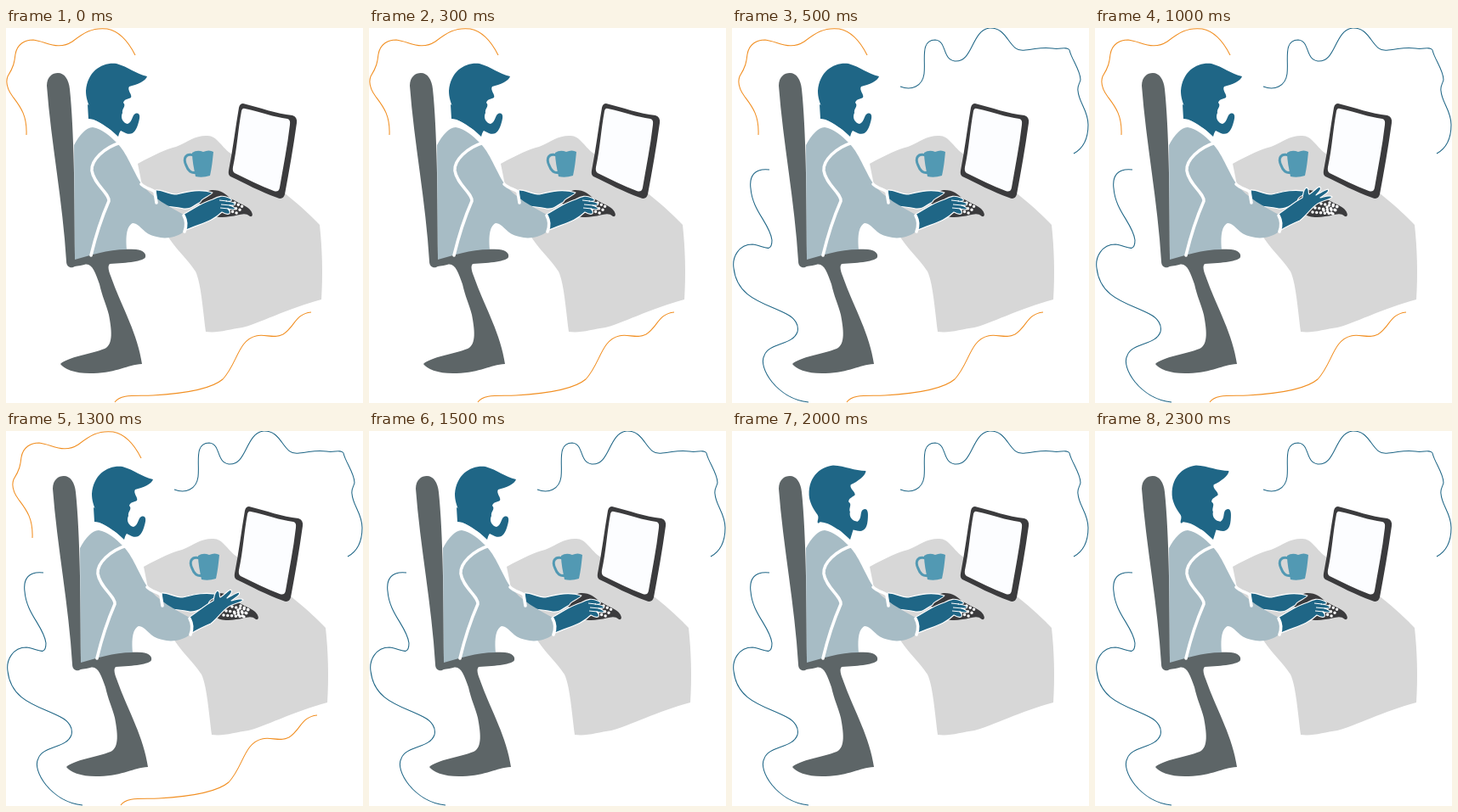
An HTML page for the animation above (2.5 s loop, 420 by 442 pixels).

```html
<!DOCTYPE html>
<html lang="en">
<head>
<meta charset="utf-8">
<title>Working at the desk</title>
<style>
  html, body { margin: 0; width: 100%; height: 100%; overflow: hidden; background: #fff; }
  svg { display: block; width: 420px; height: 442px; }
  .line { fill: none; stroke-width: 1.05; }
  .skin { fill: #1f6686; }
  .hand { fill: #1f6686; stroke: #fff; stroke-width: 1.1; stroke-linejoin: round; }
  .ink { fill: #3b3b3d; }
  .seam { fill: none; stroke: #fff; stroke-width: 3.6; stroke-linecap: round; }
  .keys { fill: none; stroke: #fff; stroke-width: 3.5; stroke-linecap: round; stroke-dasharray: 0 4.8; }
</style>
</head>
<body>
<svg viewBox="0 0 420 442">
  <g id="stage">
    <g id="orange" class="line" stroke="#f18e20">
      <path d="M31 126C32 103 24 93 15 81C9 73 6 65 9 57C16 46 17 40 18 31C20 19 29 14 39 14C55 16 68 27 85 16C98 6 108-1 126 1C142 4 152 18 159 32"/>
      <path d="M135 441C142 431 160 434 180 433C215 431 248 426 262 414C279 396 280 368 301 363C312 360 322 367 333 361C347 352 347 337 366 335"/>
    </g>
    <g id="blue" class="line" stroke="#1f6686">
      <path d="M198 69C211 74 224 69 226 54C228 38 221 14 239 14C253 15 247 37 262 39C284 41 281 3 303 0C326-1 325 30 345 26C358 25 364 22 377 24C386 26 393 21 397 26C399 36 410 50 410 61C409 66 406 68 407 74C408 88 419 97 419 114C419 130 413 142 402 148"/>
      <path d="M44 167C27 165 20 174 22 189C24 216 45 231 47 250C47 267 36 256 24 255C8 255 0 270 2 283C6 319 39 324 64 337C74 342 79 350 77 358C72 374 43 371 38 386C30 400 53 437 90 441"/>
    </g>

    <path fill="#d7d7d7" d="M162 160C182 149 195 143 207 140C222 134 228 127 243 127C254 126 260 139 270 147C310 175 350 204 376 232C379 260 380 290 378 320C340 330 300 350 285 353C270 355 256 360 242 358C238 325 236 300 230 287C221 273 210 264 199 248L168 190Z"/>

    <path class="ink" d="M286 89C306 94 325 101 344 103Q350 105 349 112C345 141 340 169 335 196Q333 203 326 200C306 193 288 183 271 175Q268 173 269 168C274 142 277 117 281 94Q282 89 286 89Z"/>
    <path fill="#fcfdff" d="M288 95C307 99 322 105 338 107Q342 108 341 114C338 140 333 164 329 188Q328 194 322 192C306 186 291 178 276 171Q273 169 274 164C279 141 280 119 284 98Q285 94 288 95Z"/>

    <g fill="#5299b3">
      <path d="M226 147Q232 143 239 146Q246 143 251 146C250 156 249 165 247 174Q238 177 230 175C228 165 226 156 226 147Z"/>
      <path d="M228 150C218 147 215 154 219 162C221 168 225 172 231 170" fill="none" stroke="#5299b3" stroke-width="3"/>
    </g>

    <path fill="#5d6567" d="M55 68C55 57 62 53 68 53C76 53 81 61 82 72C87 120 88 200 88 268C110 262 138 260 160 261C169 262 172 266 171 270C169 275 150 277 129 278C125 282 130 291 133 300C144 330 162 361 167 396C149 397 139 406 110 407C90 408 75 402 71 396C79 388 108 384 123 378C134 373 131 354 128 338C125 326 120 316 117 302C112 288 108 276 99 279C93 281 88 280 86 282C82 283 78 281 78 275C74 206 60 135 55 68Z"/>

    <path class="skin" d="M103 90L104 107C119 108 130 120 139 128L143 115Z"/>
    <path id="head" class="skin" d="M101 74C103 50 121 40 137 42C151 46 160 54 173 57C172 62 161 67 152 69C149 73 156 79 154 82C150 84 146 84 145 88C149 92 143 95 144 100C141 106 145 112 150 113C156 111 155 103 159 101C165 99 165 105 163 111C160 122 156 127 148 124L142 121L139 125L104 104C104 101 107 99 106 95C103 87 101 82 101 74Z"/>

    <path class="ink" d="M231 203C238 200 243 190 250 191C260 191 266 196 270 200C279 206 287 208 293 213C298 218 298 223 294 222C287 216 280 222 271 222C261 224 250 223 247 219Z"/>
    <path class="keys" d="M276 206L286 211M273 211L284 215M269 215L281 219"/>

    <g id="resting">
      <path class="hand" d="M183 191C190 190 198 196 208 196C220 193 234 189 250 194C246 199 236 201 236 205C229 208 226 214 216 213C205 210 194 212 184 206Z"/>
      <path class="hand" d="M215 220C229 212 239 205 250 202C257 198 262 197 269 200C274 202 274 205 266 204C277 205 281 210 270 209C279 212 279 216 268 213C273 218 270 222 261 217C250 228 238 230 219 238Z"/>
      <path d="M258 203L267 204M260 208L271 209M259 212L269 213" stroke="#fff" stroke-width="1"/>
    </g>
    <g id="raised">
      <path class="keys" d="M266 207L286 211M259 212L284 215M256 217L281 219"/>
      <path class="hand" d="M183 191C190 190 198 196 208 196C220 193 234 189 251 193C243 198 236 201 239 205C230 208 226 214 216 213C205 210 194 212 184 206Z"/>
      <path class="hand" d="M215 220C228 211 236 204 244 200C245 195 245 190 249 188C253 190 250 193 252 196C257 193 260 189 264 187C268 189 263 194 260 197C266 194 270 191 274 190C277 193 270 196 265 200C270 199 276 196 279 199C276 203 268 203 262 207C254 212 250 220 241 227C234 230 227 233 219 238Z"/>
    </g>

    <path fill="#a7bcc5" d="M87 138C93 127 101 117 109 117C120 119 129 127 137 135C149 146 157 170 166 183C178 200 200 211 218 221C220 229 219 236 215 241C207 247 194 249 184 246C168 243 166 231 156 230C148 234 148 248 149 261C125 261 107 268 88 273Z"/>
    <path class="seam" d="M142 135C122 141 107 156 108 168C110 184 129 195 128 204C121 220 113 243 107 268"/>
    <path class="seam" d="M104 109C118 110 130 122 140 134M166 184C171 189 178 190 182 193L184 206M216 221Q221 230 217 240"/>
  </g>
</svg>
<script>
  const STEP = 500, STEPS = 5;
  const get = id => document.getElementById(id);
  const show = (id, on) => get(id).setAttribute("visibility", on ? "visible" : "hidden");
  const move = (id, value) => get(id).setAttribute("transform", value);

  function draw() {
    const step = Math.floor(performance.now() / STEP) % STEPS;
    move("stage", `translate(${step === 0 ? -7 : 0} 0)`);
    move("head", step === 4 ? "translate(1 -1) rotate(-13 125 125)" : "");
    show("orange", step < 3);
    show("blue", step > 0);
    show("raised", step === 2);
    show("resting", step !== 2);
    requestAnimationFrame(draw);
  }
  draw();
</script>
</body>
</html>
```
